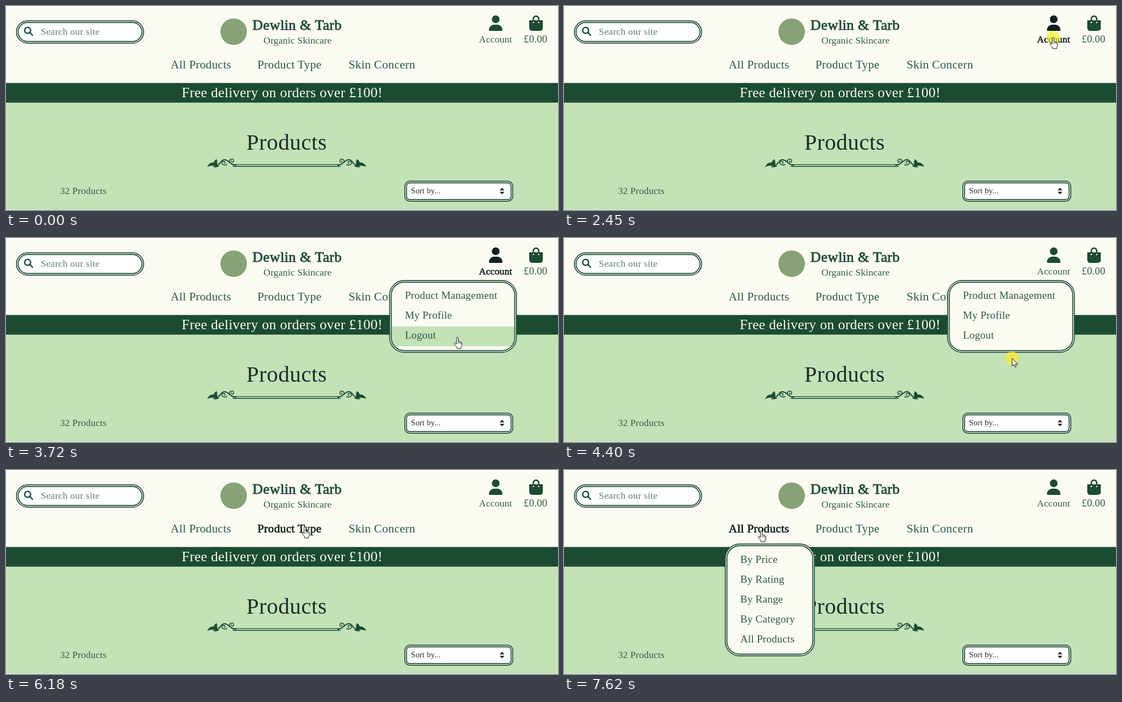
Animation of 999x369 px, one loop 8000 ms. Source, as an HTML page:

```html
<!DOCTYPE html>
<html lang="en">
<head>
<meta charset="utf-8">
<title>Shop header</title>
<style>
html, body { margin: 0; width: 100%; height: 100%; overflow: hidden; background: #fcfbf3; }
svg { display: block; width: 999px; height: 369px; }
text { font-family: "Liberation Serif", "Times New Roman", serif; letter-spacing: .012em; white-space: pre; }
.link { fill: #2b5941; color: #1c4b33; }
.link.hot { fill: #12211f; color: #12211f; }
.link.hot text { stroke: #12211f; stroke-width: .7; }
</style>
</head>
<body>
<svg id="stage" viewBox="0 0 999 369" xmlns="http://www.w3.org/2000/svg"></svg>
<script>
const GREEN = '#1c4b33', SOFT = '#2b5941', CREAM = '#fcfbf3', SAGE = '#c3e2b7', INK = '#1b2c28';
const LOOP = 8000;

const rect = (x, y, w, h, fill, more = '') =>
  `<rect x="${x}" y="${y}" width="${w}" height="${h}" fill="${fill}" ${more}/>`;
const label = (x, y, size, str, more = '') =>
  `<text x="${x}" y="${y}" font-size="${size}" ${more}>${str}</text>`;
const link = (id, body) => `<g id="${id}" class="link">${body}</g>`;

// Rounded panel with a double border; "inside" is painted beneath the inner line.
function panel(x, y, w, h, r, fill, inside = '') {
  const ring = (d, paint) => rect(x + d, y + d, w - 2 * d, h - 2 * d, paint,
    `rx="${r - d}" stroke="${GREEN}" stroke-width="1.7"`);
  return ring(.85, fill) + inside + ring(3.85, 'none');
}

const userIcon = `<g transform="translate(874 17) scale(.0547)" fill="currentColor">
  <circle cx="224" cy="128" r="128"/>
  <path d="M178 304h92C368 304 448 384 448 482q0 30-30 30H30Q0 512 0 482C0 384 80 304 178 304z"/></g>`;

const bagIcon = `<g transform="translate(947 17) scale(.0547)" fill="currentColor">
  <path d="M136 200V112a88 88 0 0 1 176 0v88" fill="none" stroke="currentColor" stroke-width="48"/>
  <path d="M0 160h448v256a96 96 0 0 1-96 96H96a96 96 0 0 1-96-96z"/>
  <circle cx="136" cy="232" r="24" fill="${CREAM}"/><circle cx="312" cy="232" r="24" fill="${CREAM}"/></g>`;

const scroll = `
  <path d="M364 291q4-9 12-8 1-4 5-6 3 7 0 13-8-3-17 1z" fill="${GREEN}" stroke="none"/>
  <path d="M374 291q8-5 12-1-6 3-12 1z" fill="${GREEN}" stroke="none"/>
  <path d="M379 288c10 1 9-11 17-10s10 10 20 10" stroke-width="2"/>
  <path d="M400 287c-8 3-12-4-7-6 4-1 5 4 2 4" stroke-width="1.5"/>
  <path d="M404 283c-1-7 8-8 8-3 0 4-5 3-4 0" stroke-width="1.5"/>`;

const accountItems = ['Product Management', 'My Profile', 'Logout'];
const rangeItems = ['By Price', 'By Rating', 'By Range', 'By Category', 'All Products'];
const itemList = (items, x, y) => items.map((s, i) => label(x, y + i * 36, 19, s)).join('');

const accountMenu = panel(693.5, 76, 231, 131.5, 27, CREAM,
    `<clipPath id="inner"><rect x="697" y="80" width="224" height="123" rx="23"/></clipPath>
     <g clip-path="url(#inner)">${rect(697, 88, 224, 36, SAGE, 'id="row"')}</g>`) +
  itemList(accountItems, 722, 110);

const rangeMenu = panel(291, 133, 163, 204, 27, CREAM) + itemList(rangeItems, 319, 168);

document.getElementById('stage').innerHTML =
  rect(0, 0, 999, 369, CREAM) +
  rect(0, 150, 999, 218, SAGE) +
  rect(0, 139.25, 999, 35.5, GREEN) +
  rect(0, 368, 999, 1, '#e6e9e3') +

  panel(18, 26, 232, 42, 21, '#fff') +
  `<g fill="none" stroke="${GREEN}" stroke-width="2.4" stroke-linecap="round">
     <circle cx="39.2" cy="44" r="5.4"/><path d="M43.4 48.2 48 52.8"/></g>` +
  label(63, 52, 17.4, 'Search our site', 'fill="#64806f"') +

  `<circle cx="412" cy="46.5" r="24" fill="#86a276"/>` +
  label(446, 42.5, 26.2, 'Dewlin &amp; Tarb', `fill="${GREEN}" stroke="${GREEN}" stroke-width=".8"`) +
  label(466, 68, 17.3, 'Organic Skincare', `fill="${SOFT}"`) +

  link('account', userIcon + label(856, 66, 17.3, 'Account')) +
  link('bag', bagIcon + label(937, 66, 18.5, '£0.00')) +
  link('all', label(298, 113, 21.2, 'All Products')) +
  link('type', label(455, 113, 21.2, 'Product Type')) +
  link('skin', label(620, 113, 21.5, 'Skin Concern')) +

  label(318, 164.5, 25.4, 'Free delivery on orders over £100!', `fill="${CREAM}"`) +
  label(435, 260, 40.5, 'Products', `fill="${INK}"`) +
  `<g fill="none" stroke="${GREEN}" stroke-linecap="round">
     ${scroll}<g transform="translate(1016 0) scale(-1 1)">${scroll}</g>
     <path d="M411 286.8H605" stroke-width="1.2"/><path d="M411 290.2H605" stroke-width="1.6"/></g>` +
  label(98, 340, 17.2, '32 Products', 'fill="#3a5748"') +
  panel(721, 316, 197, 38, 10, '#fff') +
  label(733, 339, 14.4, 'Sort by...', `fill="${INK}"`) +
  `<path d="M893.5 333.5h8.5l-4.25-4.8zM893.5 336h8.5l-4.25 4.8z" fill="${INK}"/>` +

  `<g id="accountMenu" fill="${SOFT}">${accountMenu}</g>
   <g id="rangeMenu" fill="${SOFT}">${rangeMenu}</g>
   <circle id="click" r="12.2" fill="#fbf02a" fill-opacity=".7"/>
   <g id="pointer" fill="#fff" stroke="#111" stroke-linejoin="round">
     <path id="arrow" d="M0 0V14.5L3.4 11.4 5.6 16.3 7.7 15.4 5.6 10.7H10.2z"/>
     <g id="hand"><path d="M-1.5 12V1.5a1.6 1.6 0 0 1 3.2 0V7.5q2.2-1 2.4.8 2-.8 2.2 1 1.8-.4 1.8 1.2V14q0 2-1.3 3.5V20H-.5v-2q-3-3-5-7 .8-2 2.3-.8z"/>
       <path d="M1.7 8v4M4.1 8.5V12M6.3 9.5V12" stroke-width=".7"/></g>
   </g>`;

// Pointer moves: start, end, number of steps, then start, bend and end points.
const moves = [
  [500, 830, 5, [1004, 80], [980, 74], [958, 73]],
  [1510, 2120, 8, [958, 73], [925, 100], [885, 57]],
  [3210, 3970, 10, [885, 57], [818, 128], [811, 217.5]],
  [5010, 5350, 5, [811, 217.5], [735, 172], [690, 108]],
  [5930, 6180, 4, [690, 108], [616, 104], [541, 103]],
  [6680, 7020, 5, [541, 103], [450, 105], [357, 110]]
];
const clicks = [[2450, 2710], [4400, 4590], [7360, 7620]];

// Hover areas: left, top, right, bottom.
const areas = {
  account: [855, 17, 917, 78], bag: [936, 17, 982, 78],
  all: [297, 92, 409, 122], type: [454, 92, 574, 122], skin: [619, 92, 743, 122]
};

const $ = id => document.getElementById(id);
const show = (id, on) => $(id).setAttribute('visibility', on ? 'visible' : 'hidden');
const within = (t, [a, b]) => t >= a && t < b;

function pointerAt(t) {
  const move = moves.filter(m => t >= m[0]).pop();
  if (!move) return null;
  const [start, end, n, a, b, c] = move;
  const step = Math.min(n - 1, Math.floor((t - start) / (end - start) * (n - 1)));
  const u = (step + 1) / n, p = u * u * (3 - 2 * u), q = 1 - p;
  return a.map((v, i) => q * q * v + 2 * p * q * b[i] + p * p * c[i]);
}

function draw(t) {
  const pos = pointerAt(t), [x, y] = pos || [-50, -50];
  const menuOpen = within(t, [2710, 4590]);
  const row = menuOpen && x > 698 && x < 920 ? Math.floor((y - 88) / 36) : -1;
  const onRow = row >= 0 && row < 3;
  let over = onRow;

  for (const [id, [l, top, r, b]] of Object.entries(areas)) {
    const hit = !onRow && x >= l && x <= r && y >= top && y <= b;
    const focus = id === 'account' && within(t, [2450, 4400]);
    $(id).classList.toggle('hot', hit || focus);
    over = over || hit;
  }

  show('accountMenu', menuOpen);
  show('row', onRow);
  if (onRow) $('row').setAttribute('y', 88 + row * 36);
  show('rangeMenu', t >= 7620);

  const place = `translate(${x.toFixed(1)} ${y.toFixed(1)})`;
  $('click').setAttribute('transform', place);
  $('pointer').setAttribute('transform', place);
  show('click', clicks.some(c => within(t, c)));
  show('arrow', pos && !over);
  show('hand', pos && over);
}

const begin = performance.now();
function tick() {
  draw((performance.now() - begin) % LOOP);
  requestAnimationFrame(tick);
}
tick();
</script>
</body>
</html>
```
